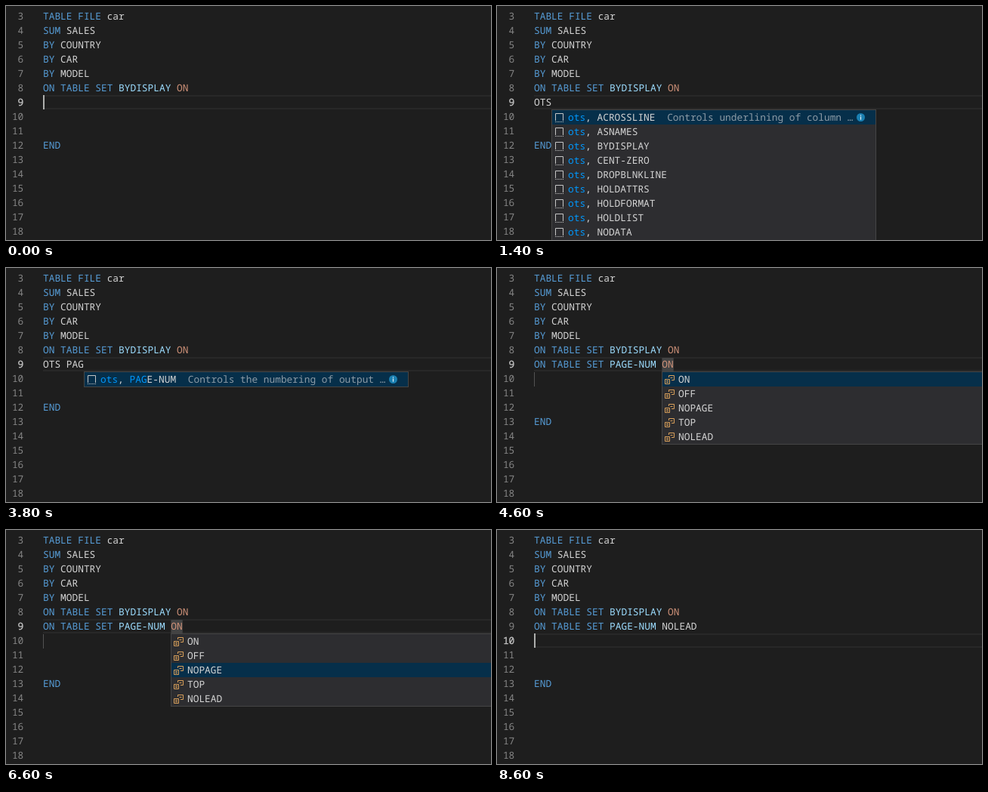
An HTML page that plays this animation: 642x310 px, repeating every 9 s.

```html
<!DOCTYPE html>
<html lang="en">
<head>
<meta charset="utf-8">
<title>Editor completion</title>
<style>
  html, body { margin: 0; width: 100%; height: 100%; overflow: hidden; background: #1e1e1e; }
  svg { display: block; width: 642px; height: 310px; }
  text {
    font-family: "Noto Sans Mono", "DejaVu Sans Mono", monospace;
    font-size: 12.83px;
    white-space: pre;
    text-rendering: geometricPrecision;
  }
</style>
</head>
<body>
<svg id="stage" viewBox="0 0 642 310" xmlns="http://www.w3.org/2000/svg"></svg>
<script>
const LOOP = 9000, LEFT = 49, CHAR = 7.698, ROW = 19, FIRST = 3, TOP = 4;
const C = {
  key: '#569cd6', text: '#d4d4d4', name: '#9cdcfe', value: '#ce9178',
  match: '#0097fb', dim: '#858585', active: '#c6c6c6', detail: '#8d9ba6'
};
const stage = document.getElementById('stage');

const rowTop = n => TOP + (n - FIRST) * ROW;
const colX = n => LEFT + n * CHAR;
const rect = (x, y, w, h, fill, more = '') =>
  `<rect x="${x}" y="${y}" width="${w}" height="${h}" fill="${fill}" ${more}/>`;
const path = (d, color) => `<path d="${d}" fill="none" stroke="${color}"/>`;
const span = ([kind, s]) => `<tspan fill="${C[kind]}">${s}</tspan>`;
const line = (x, y, parts, more = '') =>
  `<text x="${x}" y="${y}" ${more}>${parts.map(span).join('')}</text>`;

const setLine = (...tail) => [['key', 'ON TABLE SET '], ...tail];
const header = [
  [['key', 'TABLE FILE '], ['text', 'car']],
  [['key', 'SUM '], ['text', 'SALES']],
  [['key', 'BY '], ['text', 'COUNTRY']],
  [['key', 'BY '], ['text', 'CAR']],
  [['key', 'BY '], ['text', 'MODEL']],
  setLine(['name', 'BYDISPLAY '], ['value', 'ON'])
];

const options = ['ACROSSLINE', 'ASNAMES', 'BYDISPLAY', 'CENT-ZERO', 'DROPBLNKLINE',
  'HOLDATTRS', 'HOLDFORMAT', 'HOLDLIST', 'NODATA'];
const choices = ['ON', 'OFF', 'NOPAGE', 'TOP', 'NOLEAD'];
const underline = 'Controls underlining of column …';
const numbering = 'Controls the numbering of output …';

// Splits a label into matched and plain runs.
function snippet(option, prefix, query) {
  const at = query ? option.indexOf(query) : 0;
  return [
    ['match', 'ots'.slice(0, prefix)], ['text', 'ots'.slice(prefix) + ', ' + option.slice(0, at)],
    ['match', query], ['text', option.slice(at + query.length)]
  ].filter(p => p[1]);
}
const snippets = (list, detail, prefix = 3, query = '') =>
  ({ items: list.map(o => snippet(o, prefix, query)), detail, icon: snippetIcon });
const choiceMenu = { items: choices.map(c => [['text', c]]), icon: choiceIcon };

// Typing a plain word also moves the caret and the menu to its end.
const type = (word, menu = null) =>
  ({ code: [['text', word]], col: word.length, menu, sel: 0, caret: true });
const expanded = (kind, value) => setLine(['name', 'PAGE-NUM '], [kind, value]);
const on = { caret: true }, off = { caret: false };

const steps = [
  [0, { code: [], col: 0, row: 9, caret: true, menu: null, sel: 0, added: 0, field: 0 }],
  [200, type('O')],
  [400, type('O', snippets(options, underline, 1))],
  [600, type('OT', snippets(options, underline, 2))],
  [800, type('OTS', snippets(options, underline))],
  [1400, off],
  [1800, on],
  [2400, off],
  [2800, type('OTS ', snippets(options, underline))],
  [3000, type('OTS P', snippets(['PAGE-NUM', 'BYDISPLAY', 'DROPBLNKLINE'], numbering, 3, 'P'))],
  [3200, type('OTS PA', snippets(['PAGE-NUM'], numbering, 3, 'PA'))],
  [3400, type('OTS PAG', snippets(['PAGE-NUM'], numbering, 3, 'PAG'))],
  [3800, off],
  [4000, { code: expanded('value', 'ON'), col: 22, caret: true, menu: null, added: 1, field: 2 }],
  [4200, { menu: choiceMenu }],
  [4600, off],
  [5000, on],
  [5600, off],
  [5800, { sel: 1 }],
  [6200, { sel: 2, caret: true }],
  [6600, off],
  [6800, { sel: 3 }],
  [7000, { sel: 4 }],
  [7200, on],
  [7600, { code: expanded('text', 'NOLEAD'), col: 28, menu: null, field: 6 }],
  [7800, { row: 10, col: 0, field: 0, caret: true }],
  [8200, off],
  [8600, on]
];
const states = [];
for (const [at, change] of steps) states.push({ ...states[states.length - 1], ...change, at });

function snippetIcon(x, y) {
  return path(`M${x + 5.5} ${y + 14}V${y + 4.5}H${x + 15.5}V${y + 14}`, '#c5c5c5') +
    `<path d="M${x + 5} ${y + 15.5}H${x + 16}" stroke="#c5c5c5" stroke-dasharray="1 1"/>`;
}

function choiceIcon(x, y) {
  const color = '#d9a05a';
  return path(`M${x + 9.5} ${y + 7}V${y + 4.5}H${x + 16.5}V${y + 10.5}H${x + 13}` +
    `M${x + 11.5} ${y + 7.5}H${x + 14.5}`, color) +
    path(`M${x + 4.5} ${y + 9.5}H${x + 10.5}V${y + 15.5}H${x + 4.5}Z` +
    `M${x + 6} ${y + 11.5}H${x + 9}M${x + 6} ${y + 13.5}H${x + 9}`, color);
}

function infoIcon(x, y) {
  return `<circle cx="${x}" cy="${y}" r="5.5" fill="#1b80b2"/>` +
    rect(x - 0.6, y - 3.2, 1.2, 1.3, '#e4f1f8') + rect(x - 0.6, y - 1, 1.2, 4.2, '#e4f1f8');
}

function drawMenu({ items, detail, icon }, sel, col) {
  const x = Math.round(colX(col)), y = rowTop(10), w = 430;
  const shown = detail === underline ? items.length + 3 : items.length;
  let out = rect(x + 0.5, y + 0.5, w - 1, shown * ROW + 1, '#2d2d30', 'stroke="#454545"');
  out += rect(x + 1, y + 1 + sel * ROW, w - 2, ROW, '#062f4a');
  items.forEach((parts, i) => {
    const top = y + 1 + i * ROW;
    out += icon(x, top) + line(x + 22, top + 14, parts);
    if (i === sel && detail) {
      const chars = parts.reduce((n, p) => n + p[1].length, 0);
      out += line(x + 22 + chars * CHAR + 15.7, top + 14, [['detail', detail]]);
      out += infoIcon(x + w - 20.5, top + 9.5);
    }
  });
  return out;
}

function draw(s) {
  const y = rowTop(s.row);
  let out = rect(0, 0, 642, 310, '#1e1e1e');
  out += rect(LEFT, y, 593, 2, '#282828') + rect(LEFT, y + 17, 593, 2, '#282828');
  if (s.field) {
    out += rect(colX(22), rowTop(9) + 1, s.field * CHAR, 18, '#434343');
    out += rect(LEFT, rowTop(10) + 1, 1, 19, '#525252');
  }
  for (let n = FIRST; n <= 18; n++) {
    const here = n === s.row;
    out += line(23.3, rowTop(n) + 14, [[here ? 'active' : 'dim', n]],
      'text-anchor="end"' + (here ? ' stroke="#c6c6c6" stroke-width="0.3"' : ''));
  }
  header.forEach((parts, i) => { out += line(LEFT, rowTop(FIRST + i) + 14, parts); });
  out += line(LEFT, rowTop(9) + 14, s.code);
  out += line(LEFT, rowTop(12 + s.added) + 14, [['key', 'END']]);
  if (s.menu) out += drawMenu(s.menu, s.sel, s.col);
  if (s.caret) out += rect(Math.round(colX(s.col)), y, 2, ROW, '#aeafad');
  stage.innerHTML = out;
}

let current = null;
function tick() {
  const t = performance.now() % LOOP;
  const state = states.filter(s => s.at <= t).pop();
  if (state !== current) draw(current = state);
  requestAnimationFrame(tick);
}
tick();
</script>
</body>
</html>
```
